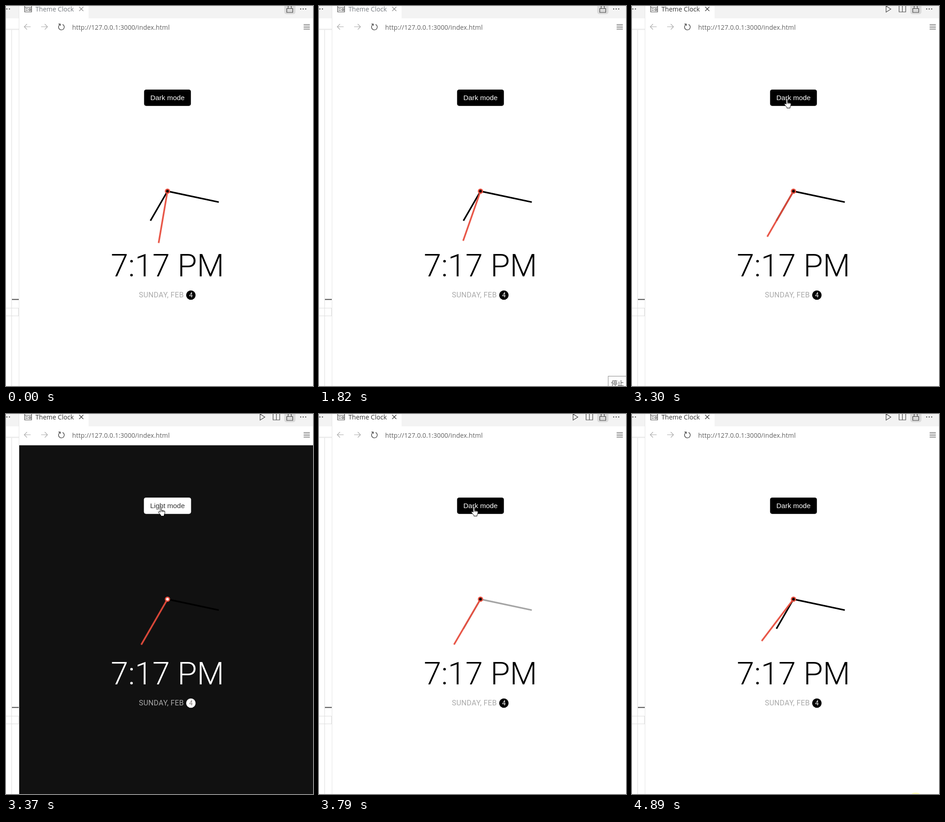
An HTML page for the animation above (4.96 s loop, 673 by 832 pixels).

```html
<!DOCTYPE html>
<html lang="en">
<head>
<meta charset="utf-8">
<title>Theme Clock</title>
<style>
  html, body { margin: 0; width: 100%; height: 100%; overflow: hidden; background: #fff; }
  svg { display: block; width: 673px; height: 832px; overflow: hidden; }
  svg, svg * { animation-duration: 4960ms; animation-iteration-count: infinite; }

  /* Theme switch: hard change of the shared colours */
  svg { --d: 0; --page: #fff; --fg: #000; --num: #fff; animation-name: theme; animation-timing-function: step-end; }
  @keyframes theme {
    0%, 75.7%, 100% { --d: 0; --page: #fff; --fg: #000; --num: #fff; }
    67.74% { --d: 1; --page: #111; --fg: #fff; --num: #857f7c; }
  }
  .page { fill: var(--page); }
  .fg { fill: var(--fg); }
  .num { fill: var(--num); }
  .toLight { opacity: var(--d); }
  .toDark { opacity: calc(1 - var(--d)); }

  /* Clock hands */
  .hand { stroke-width: 3.45; transform-origin: 354px 405.5px; }
  .main { stroke: #000; animation-name: tint; }
  .hour { transform: rotate(210deg); }
  .minute { transform: rotate(102deg); }
  .second { stroke: #e74c3c; animation-name: tick; animation-timing-function: ease-in; }
  @keyframes tint {
    0% { stroke: #000; }
    67.74% { stroke: #000; animation-timing-function: cubic-bezier(.335, 0, .75, .58); }
    75.7% { stroke: #a8a8a8; animation-timing-function: ease-in; }
    82.4%, 100% { stroke: #000; }
  }
  @keyframes tick {
    0% { transform: rotate(189.7deg); animation-timing-function: linear; }
    2.62%, 12.7% { transform: rotate(192deg); }
    22.78%, 32.66% { transform: rotate(198deg); }
    42.74%, 52.22% { transform: rotate(204deg); }
    62.3%, 74.6% { transform: rotate(210deg); }
    84.68% { transform: rotate(216deg); }
    94.56% { transform: rotate(216deg); animation-timing-function: cubic-bezier(.315, 0, .68, .46); }
    100% { transform: rotate(218.15deg); }
  }

  /* Editor focus after the click */
  .step { animation-timing-function: step-end; }
  .tools { animation-name: focusTools; }
  .title { fill: #74797f; animation-name: focusTitle; }
  .close { stroke: #8a8a8a; animation-name: focusClose; }
  @keyframes focusTools { 0% { opacity: 0; } 65.2%, 100% { opacity: 1; } }
  @keyframes focusTitle { 0% { fill: #74797f; } 65.2%, 100% { fill: #333; } }
  @keyframes focusClose { 0% { stroke: #8a8a8a; } 65.2%, 100% { stroke: #333; } }

  /* Tooltip, pointer, highlight */
  .tip { animation-name: tip; animation-timing-function: linear; }
  @keyframes tip {
    0%, 20.2% { opacity: 0; }
    24.2%, 48.6% { opacity: 1; }
    50.4%, 100% { opacity: 0; }
  }
  .pointer { animation-name: move; animation-timing-function: ease-in-out; }
  @keyframes move {
    0%, 48.6% { transform: translate(645px, 838px); }
    58.5% { transform: translate(333px, 236px); }
    60.3%, 81.65% { transform: translate(338px, 203px); }
    91.7% { transform: translate(640px, 785px); }
    93.6%, 100% { transform: translate(622px, 845px); }
  }
  .arrow { animation-name: arrow; }
  .finger { animation-name: finger; }
  @keyframes arrow { 0%, 82.6%, 100% { opacity: 1; } 59.7% { opacity: 0; } }
  @keyframes finger { 0%, 82.6%, 100% { opacity: 0; } 59.7% { opacity: 1; } }
  .glow { animation-name: glow; }
  @keyframes glow { 0% { opacity: 0; } 94.4%, 100% { opacity: 1; } }

  .ui { font-family: "Open Sans", "Noto Sans", sans-serif; }
  .btn { font: 15.33px "Liberation Sans", Arial, sans-serif; text-anchor: middle; }
  .clock { font-family: Roboto, sans-serif; }
  .line { fill: none; stroke: #424242; stroke-width: 1.2; }
</style>
</head>
<body>
<svg viewBox="0 0 673 832">
  <rect width="673" height="832" fill="#fff"/>
  <rect width="673" height="27" fill="#f3f3f3"/>

  <!-- Left pane -->
  <g fill="#424242"><circle cx="2" cy="6.5" r="1.2"/><circle cx="7.5" cy="6.5" r="1.2"/></g>
  <rect y="50" width="28" height="1" fill="#e2e2e2"/>
  <rect y="51" width="28" height="2" fill="#f3f3f3"/>
  <rect x="12" y="52" width="1" height="780" fill="#dcdcdc"/>
  <rect x="-1" y="661.5" width="28.5" height="17" fill="none" stroke="#dcdcdc"/>
  <rect x="13" y="641.5" width="15" height="2" fill="#4a4a4a"/>
  <rect x="28" width="1" height="832" fill="#e4e4e4"/>

  <!-- Tab -->
  <rect x="29" width="152" height="28" fill="#fff"/>
  <g class="line">
    <path d="M41 -1H56V13H41ZM41 3H56M43 6H48M43 9.5H48M50.5 6H54V10H50.5Z"/>
    <path class="close step" d="M160.5 2L169.5 11M169.5 2L160.5 11"/>
  </g>
  <text class="ui title step" x="64.5" y="12" font-size="14.1">Theme Clock</text>

  <!-- Editor actions -->
  <rect x="610" y="-6" width="24.5" height="24" rx="5" fill="#dadada"/>
  <g class="line">
    <path d="M615.5 5.5H628.5V14H615.5ZM618.5 5.5V2Q618.5 -1.5 622 -1.5T625.5 2V5.5"/>
    <path class="tools step" d="M557 0V13.5L567.5 6.7ZM585.5 -1H600V13H585.5ZM592.7 -1V13"/>
  </g>
  <g fill="#424242"><circle cx="646" cy="6.5" r="1.2"/><circle cx="651.5" cy="6.5" r="1.2"/><circle cx="657" cy="6.5" r="1.2"/></g>

  <!-- Address bar -->
  <g class="line">
    <path stroke="#ababab" d="M54 45.5H40M46 39.5L40 45.5L46 51.5M77 45.5H91M85 39.5L91 45.5L85 51.5"/>
    <path stroke-width="1.4" d="M115 39.5H119V43.5M118.5 40.5A6.3 6.3 0 1 0 124 40.3"/>
    <path d="M652.5 40.5H666M652.5 44H666M652.5 47.5H666M652.5 51H666"/>
  </g>
  <text class="ui" x="145" y="52" font-size="14" letter-spacing=".1" fill="#616161">http://127.0.0.1:3000/index.html</text>

  <!-- Page -->
  <rect class="page" x="29" y="68.5" width="644" height="764"/>
  <g class="btn toDark">
    <rect x="302.7" y="183" width="102.6" height="35.7" rx="4.6"/>
    <text x="354" y="205.5" fill="#fff">Dark mode</text>
  </g>
  <g class="btn toLight">
    <rect x="302.3" y="183" width="103.4" height="35.7" rx="4.6" fill="#fff"/>
    <text x="354" y="205.5" fill="#333">Light mode</text>
  </g>

  <path class="hand main hour" d="M354 405.5v-74.75"/>
  <path class="hand main minute" d="M354 405.5v-115"/>
  <path class="hand second" d="M354 405.5v-115"/>
  <circle cx="354" cy="405.5" r="5.75" fill="#e74c3c"/>
  <circle class="fg" cx="354" cy="405.5" r="2.9"/>

  <g class="clock">
    <text class="fg" x="354" y="592" font-size="69" font-weight="300" text-anchor="middle">7:17 PM</text>
    <text x="291.3" y="638" font-size="16.1" letter-spacing=".345" fill="#aaa">SUNDAY, FEB</text>
    <circle class="fg" cx="405.3" cy="633" r="10.35"/>
    <text class="num" x="405.3" y="637.8" font-size="13.8" text-anchor="middle">4</text>
  </g>

  <g class="tip">
    <rect x="634" y="810.5" width="60" height="40" fill="#fff" stroke="#858585"/>
    <text x="640.5" y="830.5" font-size="14" fill="#484848" font-family="'Noto Sans CJK SC', 'Noto Sans CJK', sans-serif">停止</text>
  </g>
  <ellipse class="glow step" cx="622" cy="832" rx="9" ry="3" fill="#ffffb8"/>

  <g class="pointer" fill="#fff" stroke="#000" stroke-linejoin="round">
    <path class="arrow step" d="M0 0V16.5L3.8 13L6.5 19L9 18L6.4 12H11.5Z"/>
    <path class="finger step" d="M0 12V1.5a1.5 1.5 0 0 1 3 0V8l6 1.3q1.5.4 1.4 2L10 15l-1.5 3v2.5h-7V18.5L-3.5 13q-1-1.6.3-2.2T0 12zM3 8V11.5M5.5 8.6V11.5M8 9.1V11.5"/>
  </g>
</svg>
</body>
</html>
```
